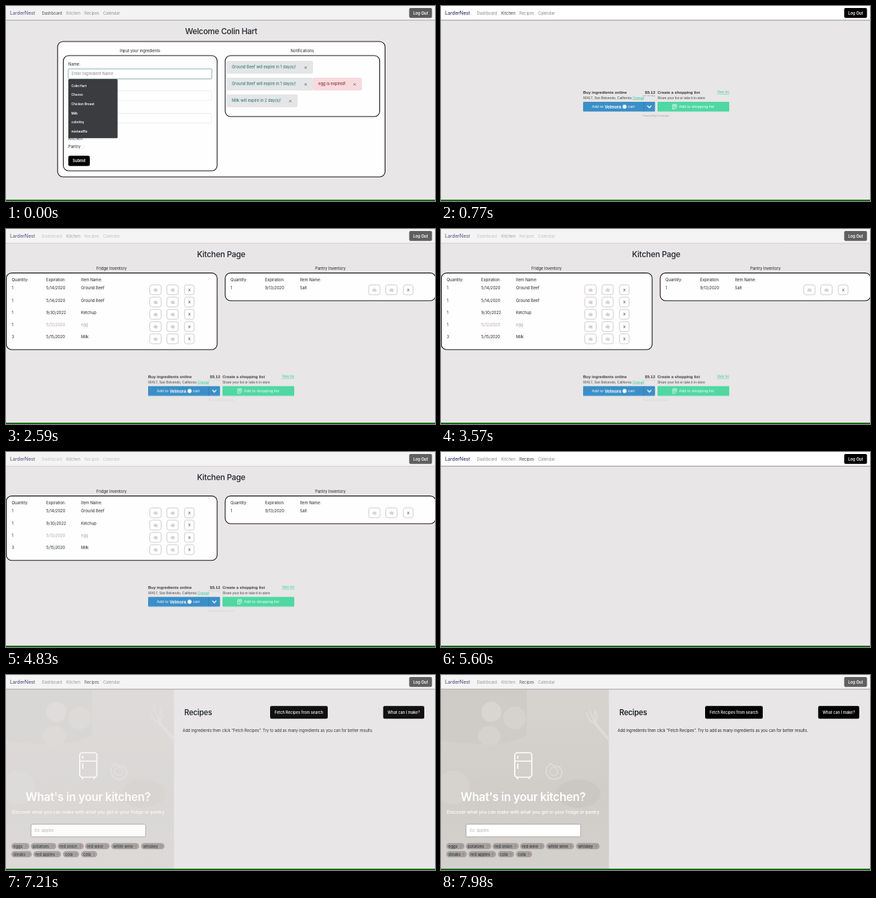
These frames come from a looping animation (640x291 px, 8 s). An HTML page:

```html
<!DOCTYPE html>
<html lang="en">
<head>
<meta charset="utf-8">
<title>Kitchen planner</title>
<style>
  html, body { margin: 0; width: 100%; height: 100%; overflow: hidden; background: #e8e6e7; }
  svg { display: block; width: 100%; height: 100%; }
  text { font: 5.85px Inter, sans-serif; fill: #212529; white-space: pre; }
  .mid { text-anchor: middle; }
  .title { font-size: 11.8px; font-weight: 500; letter-spacing: -.02em; }
  .label { font-weight: 600; font-size: 5.8px; fill: #fff; }
  .shop text { font-family: "Liberation Sans", Arial, sans-serif; font-size: 5.03px; fill: #444; }
  .shop .head { font-size: 6.05px; font-weight: 700; fill: #333; }
  .shop .btn { font-size: 6px; fill: #fff; }
  .shop .link { fill: #35cfa0; text-decoration: underline; }
  .shop .tiny { font-size: 3.6px; fill: #999; }
  .card { fill: #fefefe; stroke: #111; stroke-width: 1.1; }
  .field { fill: #fff; stroke: #e2e4e6; stroke-width: .7; }
</style>
</head>
<body>
<svg id="stage" viewBox="0 0 640 291" preserveAspectRatio="none"></svg>
<script>
const LOOP = 8000;
const OPEN_KITCHEN = 630, SHIFT = 1400, REMOVE = 4480, OPEN_RECIPES = 5600;
const ROW = 18.3;

const text = (x, y, s, cls = '', extra = '') =>
  `<text x="${x}" y="${y}" class="${cls}" ${extra}>${s}</text>`;
const rect = (x, y, x2, y2, r, extra = '') =>
  `<rect x="${x}" y="${y}" width="${x2 - x}" height="${y2 - y}" rx="${r}" ${extra}/>`;
const group = (id, body, extra = '') => `<g id="${id}" ${extra}>${body}</g>`;
const fill = c => `fill="${c}"`;
const tint = c => `style="fill:${c}"`;

// Navigation bar
const nav = () =>
  rect(0, 0, 640, 21, 0, 'id="bar" fill="#fff"') +
  rect(0, 20.7, 640, 21.5, 0, 'id="barLine" fill="#777"') +
  group('brand', text(6, 13, 'LarderNest', '', 'style="font-size:7.1px;fill:#15124f"')) +
  group('links', [['Dashboard', 53.5], ['Kitchen', 90], ['Recipes', 117], ['Calendar', 145]]
    .map(([s, x]) => text(x, 12.6, s, '', `id="nav${s}" style="fill:#858585"`)).join('')) +
  rect(601.5, 3, 635.5, 17.7, 2, 'id="logout"') +
  text(618.5, 12.7, 'Log Out', 'mid label');

// Dashboard page
const alertBox = (x, x2, y, s, bg, ink) =>
  rect(x, y, x2, y + 19, 2, fill(bg)) +
  text(x + 8, y + 11.3, s, '', tint(ink)) +
  text(x2 - 11, y + 12.4, '×', 'mid', 'style="font-size:8.5px;fill:#777"');

const dashboard = () => {
  const grey = '#e4e5e6', teal = '#1c6a71';
  const beef = 'Ground Beef will expire in 1 day(s)!';
  const names = ['Colin Hart', 'Cheese', 'Chicken Breast', 'Milk', 'colinhtq', 'mintwaffle'];
  return text(321, 41.7, 'Welcome Colin Hart', 'mid title') +
    rect(77, 53, 565.5, 255, 8, 'class="card"') +
    text(200, 69.3, 'Input your ingredients', 'mid') +
    text(442, 69.3, 'Notifications', 'mid') +
    rect(85.5, 74, 315, 246, 8, 'class="card"') +
    rect(327, 74, 557.5, 165, 8, 'class="card"') +
    text(93, 88.7, 'Name:') +
    rect(92.7, 93.6, 307.3, 109, 2, 'fill="none" stroke="#d3e0e4" stroke-width="2"') +
    rect(93.3, 94.2, 306.7, 108.4, 1.5, 'fill="#fff" stroke="#9fb3b8" stroke-width=".7"') +
    text(98, 103.4, 'Enter Ingredient Name', '', tint('#80868b')) +
    rect(93.3, 126.4, 306.7, 141, 1.5, 'class="field"') +
    rect(93.3, 160.4, 306.7, 174.5, 1.5, 'class="field"') +
    text(93, 199.6, 'Kitchen') + text(93, 212.2, 'Pantry') +
    '<circle cx="117" cy="197.6" r="2.4" class="field"/><circle cx="114" cy="210.2" r="2.4" class="field"/>' +
    rect(93, 223.4, 125, 238.7, 2.2) + text(109, 233, 'Submit', 'mid label') +
    rect(93, 109, 166.5, 197.3, 1.5, fill('#3a3c40')) +
    names.map((s, i) => text(97.5, 120.5 + i * 13.7, s, 'label', 'style="font-size:4.7px"')).join('') +
    alertBox(329, 458, 82, beef, grey, teal) +
    alertBox(329, 458, 107, beef, grey, teal) +
    alertBox(458, 531, 107, 'egg is expired!', '#f8dadd', '#721c24') +
    alertBox(329, 435, 132, 'Milk will expire in 2 day(s)!', grey, teal);
};

// Kitchen page
const key = (x, y, w, body) =>
  rect(x, y, x + w, y + 14.6, 3, 'fill="#fff" stroke="#c9c6c4" stroke-width=".9"') + body;

const item = (dx, y, [count, date, name, stale]) => {
  const ink = stale ? tint('#b3a0a0') : '';
  const top = y - 6.8, mid = y + .5;
  const icon = x => `<path d="M${x - 3} ${mid}l3.2-3v1.5h2.8v4.4h-2.8l-3.2-1.2z" fill="#d6d3d0"/>`;
  return text(dx + 8.5, y, count) + text(dx + 60, y, date, '', ink) + text(dx + 112, y, name, '', ink) +
    key(dx + 214.5, top, 17, icon(dx + 223)) +
    key(dx + 240, top, 17, icon(dx + 248.5)) +
    key(dx + 266.3, top, 14.4, text(dx + 273.5, mid + 2, 'X', 'mid', 'style="font-size:5.4px"'));
};

const heads = dx => text(dx + 8.5, 78.2, 'Quantity:') + text(dx + 60, 78.2, 'Expiration:') +
  text(dx + 112, 78.2, 'Item Name:');

const inventory = () => {
  const rows = [['1', '5/14/2020', 'Ground Beef'], ['1', '5/14/2020', 'Ground Beef'],
    ['1', '9/30/2022', 'Ketchup'], ['1', '5/12/2020', 'egg', true], ['3', '5/15/2020', 'Milk']];
  const line = i => item(0, 90.2 + i * ROW, rows[i]);
  return text(321, 41.7, 'Kitchen Page', 'mid title') +
    text(157.5, 60.8, 'Fridge Inventory', 'mid') + text(484, 60.8, 'Pantry Inventory', 'mid') +
    rect(0.5, 65.6, 315, 180, 8, 'id="tall" class="card"') +
    rect(0.5, 65.6, 315, 161.7, 8, 'id="short" class="card"') +
    rect(327, 65.6, 641, 107, 8, 'class="card"') +
    heads(0) + heads(326.5) + line(0) + group('gone', line(1)) +
    group('rest', line(2) + line(3) + line(4)) +
    item(326.5, 90.2, ['1', '9/13/2020', 'Salt']);
};

const shop = () =>
  text(212, 130.8, 'Buy ingredients online', 'head') +
  text(319.5, 130.8, '$5.12', 'head', 'text-anchor="end"') +
  text(323, 130.8, 'Create a shopping list', 'head') +
  text(430, 130.2, 'View list', 'link', 'text-anchor="end"') +
  text(212, 138.6, '90417, San Belvendo, California') +
  text(303, 138.6, 'Change', 'link', 'text-anchor="end"') +
  text(323, 138.6, 'Share your list or take it in-store') +
  rect(212, 143, 319.3, 157.4, 1, fill('#3a8fc8')) +
  rect(302, 143, 302.6, 157.4, 0, fill('#2d76aa')) +
  text(225, 152.4, 'Add to', 'btn') +
  text(244.2, 152.6, 'Velmora', 'btn', 'style="font-weight:700;font-size:6.3px"') +
  '<circle cx="273.8" cy="150.2" r="3" fill="#fff"/>' +
  text(279, 152.4, 'cart', 'btn') +
  '<path d="M307.8 148.8l3 3 3-3" fill="none" stroke="#fff" stroke-width="1.3"/>' +
  rect(323, 143, 430, 157.4, 1, fill('#4fd8a2')) +
  '<path d="M345.8 147h5.4v4.2l-2 2.4h-3.4zM347 148.8h3M347 150.4h3" fill="none" stroke="#fff" stroke-width=".8"/>' +
  text(355, 152.4, 'Add to shopping list', 'btn') +
  group('fine', text(319.3, 134.8, 'per serving', 'tiny', 'text-anchor="end"') +
    text(321, 165.3, 'Powered by Zu.example', 'mid tiny'));

// Recipes page
const photo = () => {
  const egg = (x, y, a, b, c = '#d6d2ce') => `<ellipse cx="${x}" cy="${y}" rx="${a}" ry="${b}" fill="${c}"/>`;
  return rect(0, 21.5, 250.5, 290, 0, 'fill="url(#tone)"') +
    '<path d="M0 22H128V88Q100 112 0 98z" fill="#cfccc8"/>' +
    egg(72, 91, 17, 15) + egg(110, 64, 17, 17) + egg(75, 55, 15, 15, '#d9d6d2') +
    '<g fill="none" stroke="#dedbd8" stroke-linecap="round">' +
    '<path d="M250 96L229 71" stroke-width="4"/>' +
    '<path d="M229 71q-9-1-12-14M229 71l-7-18M229 71l1-19M229 71q7-7 2-16" stroke-width="2"/>' +
    '<path d="M157 139l6-7 6 4 8 1 4 8-3 8-8 3-8-2-5-7z" stroke-width="2"/>' +
    '<circle cx="168" cy="144" r="6" stroke-width="1.5"/></g>' +
    egg(205, 177, 33, 21, '#cbc7c3') + egg(18, 168, 25, 25, '#d6d3cf');
};

const tags = (y, list) => list.map(([s, x, x2]) =>
  rect(x, y, x2, y + 9.2, 4.6, fill('#a4a19f')) + text(x + 3, y + 6.7, s) +
  text(x2 - 5, y + 6.5, 'x', 'mid', 'style="font-size:5px;fill:#c8504e"')).join('');

const recipes = () =>
  '<g fill="none" stroke="#fff" stroke-width="1.7">' + rect(110, 116, 135.5, 152.5, 4) +
  '<path d="M110 128.5h25.5M114.5 120.5v4.5M114.5 132v8M114 153v2.5M131.5 153v2.5"/></g>' +
  text(122.5, 187.6, 'What\'s in your kitchen?', 'mid',
    'style="font-size:17.1px;font-weight:600;letter-spacing:-.02em;fill:#fff"') +
  text(122.5, 207.2, 'Discover what you can make with what you got in your fridge or pantry', 'mid',
    'style="font-size:6.75px;font-weight:500;fill:#fff"') +
  rect(37.3, 222.7, 208.3, 241.4, 2, 'fill="#fff" stroke="#9b9897" stroke-width=".8"') +
  text(43, 234.2, 'Ex: apples', '', tint('#b5b3b2')) +
  tags(250.8, [['eggs', 8, 35], ['potatoes', 37, 75], ['red onion', 77, 116],
    ['red wine', 118, 154.5], ['white wine', 157, 198.5], ['whiskey', 201.5, 236.5]]) +
  tags(262.8, [['steaks', 8, 38.5], ['red apples', 41, 82], ['cola', 85, 109], ['cola', 112, 136]]) +
  text(266, 60, 'Recipes', '', 'style="font-size:11.2px;font-weight:600;letter-spacing:-.02em"') +
  rect(394, 46.3, 480, 65.3, 2.2) +
  text(437, 58, 'Fetch Recipes from search', 'mid label', 'style="font-size:5.7px;font-weight:500"') +
  rect(562.7, 46.3, 624, 65.3, 2.2) +
  text(593.4, 58, 'What can I make?', 'mid label', 'style="font-size:5.7px;font-weight:500"') +
  text(263.5, 84.6, 'Add ingredients then click "Fetch Recipes". Try to add as many ingredients as you can for better results.',
    '', 'style="font-size:5.8px"');

const $ = id => document.getElementById(id);
$('stage').innerHTML =
  '<defs><linearGradient id="tone" x2="0" y2="1"><stop stop-color="#d6d3d0"/>' +
  '<stop offset=".6" stop-color="#d0cdc9"/><stop offset="1" stop-color="#d3d0cd"/></linearGradient></defs>' +
  rect(0, 0, 640, 291, 0, fill('#e8e6e7')) +
  group('dashboard', dashboard()) +
  group('kitchen', group('inventory', inventory()) + group('shop', shop(), 'class="shop"')) +
  group('photo', photo()) + group('recipes', recipes()) + nav() +
  rect(0, 289, 640, 291, 0, fill('#0a6a12'));

// Steps are [ms, value], the first at 0; the last value holds to the end of the loop.
const start = document.timeline.currentTime ?? 0;
const play = (id, prop, steps, easing = 'linear') => {
  const frames = [...steps, [LOOP, steps[steps.length - 1][1]]]
    .map(([t, v]) => ({ offset: t / LOOP, [prop]: v, easing }));
  $(id).animate(frames, { duration: LOOP, iterations: Infinity }).startTime = start;
};
const jump = (id, prop, ...steps) => play(id, prop, steps, 'step-end');
const show = (id, from, to) => {
  const steps = [[0, from > 0 ? 0 : 1]];
  if (from > 0) steps.push([from, 1]);
  if (to < LOOP) steps.push([to, 0]);
  jump(id, 'opacity', ...steps);
};

// Bar is crisp when a page opens, then softens as its content arrives
const soften = (id, prop, first, crisp, kitchen, end) => play(id, prop, [
  [0, first], [OPEN_KITCHEN - 1, first], [OPEN_KITCHEN, crisp], [SHIFT - 200, crisp],
  [1800, kitchen], [OPEN_RECIPES - 1, kitchen], [OPEN_RECIPES, crisp], [6300, crisp], [7000, end]]);
soften('bar', 'fill', '#f3f3f3', '#ffffff', '#f4f4f4', '#f4f4f4');
soften('barLine', 'opacity', .8, 1, .3, .8);
soften('brand', 'opacity', .75, 1, .75, .8);
soften('links', 'opacity', .9, 1, .45, .85);
soften('logout', 'fill', '#5c5c5c', '#000000', '#5f5f5f', '#606060');

const idle = '#858585', on = '#3c3c3c';
jump('navDashboard', 'fill', [0, on], [OPEN_KITCHEN, idle]);
jump('navKitchen', 'fill', [0, idle], [OPEN_KITCHEN, on], [OPEN_RECIPES, idle]);
jump('navRecipes', 'fill', [0, idle], [OPEN_RECIPES, on]);

show('dashboard', 0, OPEN_KITCHEN);
show('kitchen', OPEN_KITCHEN, OPEN_RECIPES);
play('inventory', 'opacity', [[0, 0], [1820, 0], [2450, 1]]);
jump('shop', 'transform', [0, 'translateY(0px)'],
  [SHIFT, `translateY(${ROW * 5}px)`], [REMOVE, `translateY(${ROW * 4}px)`]);
play('fine', 'opacity', [[0, 1], [SHIFT - 1, 1], [SHIFT, 0], [1900, 0], [2500, .3]]);
show('tall', 0, REMOVE);
show('gone', 0, REMOVE);
show('short', REMOVE, LOOP);
jump('rest', 'transform', [0, 'translateY(0px)'], [REMOVE, `translateY(${-ROW}px)`]);

play('recipes', 'opacity', [[0, 0], [6300, 0], [7280, 1]]);
play('photo', 'opacity', [[0, 0], [6300, 0], [7900, 1]]);
</script>
</body>
</html>
```
